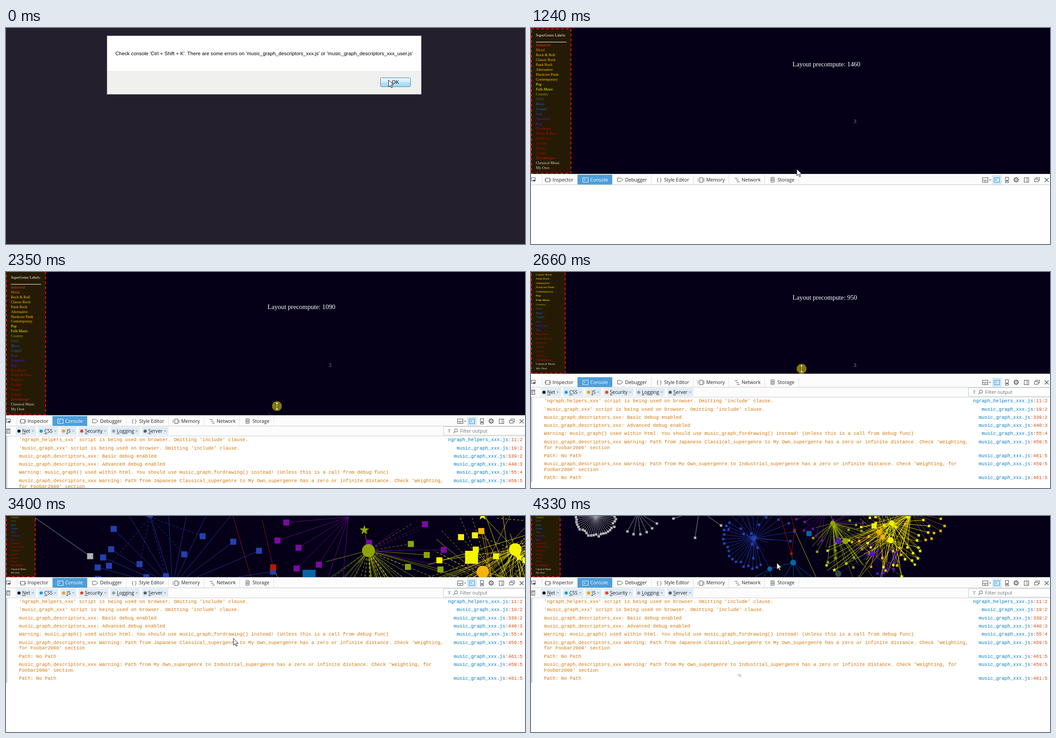
Write an HTML page with a canvas that moves like this. It is 1158x484 px and loops after 4380 ms.

```html
<!DOCTYPE html>
<html lang="en">
<head>
<meta charset="utf-8">
<title>Music graph console</title>
<style>
  html, body { margin: 0; width: 100%; height: 100%; overflow: hidden; background: #fff; }
  canvas { display: block; width: 1158px; height: 484px; }
</style>
</head>
<body>
<canvas id="stage" width="1158" height="484"></canvas>
<script>
const W = 1158, H = 484, LOOP = 4380, STEP = 71.5, DEG = Math.PI / 180;
const c = document.getElementById('stage').getContext('2d');
const SANS = '"Liberation Sans", Arial, sans-serif';
const SERIF = '"Liberation Serif", "Times New Roman", serif';
const MONO = '"Liberation Mono", "Courier New", monospace';
const UI = '"Open Sans", "Noto Sans", sans-serif';

// ---- helpers
const ramp = (t, a, b) => Math.min(1, Math.max(0, (t - a) / (b - a)));
const mix = (a, b, k) => a + (b - a) * k;

function rect(x, y, w, h, color) { c.fillStyle = color; c.fillRect(x, y, w, h); }
function box(x, y, w, h, color) { c.strokeStyle = color; c.lineWidth = 1; c.strokeRect(x + .5, y + .5, w, h); }
function dot(x, y, r, color) { c.fillStyle = color; c.beginPath(); c.arc(x, y, r, 0, 7); c.fill(); }
function ring(x, y, r, color) { c.strokeStyle = color; c.beginPath(); c.arc(x, y, r, 0, 7); c.stroke(); }
function line(color, ...p) {
  c.strokeStyle = color;
  c.beginPath();
  for (let i = 0; i < p.length; i += 2) c.lineTo(p[i], p[i + 1]);
  c.stroke();
}
function poly(pts, fill, stroke) {
  c.beginPath();
  pts.forEach(p => c.lineTo(p[0], p[1]));
  c.closePath();
  c.fillStyle = fill; c.fill();
  if (stroke) { c.strokeStyle = stroke; c.lineWidth = 1; c.stroke(); }
}
// Triangle pointing down (or up when h is negative)
function caret(x, y, w, h, color) { poly([[x - w, y], [x + w, y], [x, y + h]], color); }
// y is the middle of the capitals
function text(s, x, y, size, face, color, align = 'left') {
  c.font = size + 'px ' + face;
  c.textAlign = align;
  c.fillStyle = color;
  c.fillText(s, x, Math.round(y + size * .33));
  return c.measureText(s).width;
}

// ---- dialog
function dialog() {
  rect(0, 0, W, H, '#231f2d');
  rect(226, 18, 701, 131, '#fff');
  rect(226, 97, 701, 52, '#f0f0ee');
  rect(226, 97, 701, 1, '#dfdfdf');
  box(225, 17, 701, 131, '#a5a3aa');
  text("Check console 'Ctrl + Shift + K'. There are some errors on 'music_graph_descriptors_xxx.js' or 'music_graph_descriptors_xxx_user.js'",
    244, 57.5, 11.26, SANS, '#000');
  const g = c.createLinearGradient(0, 111, 0, 132);
  g.addColorStop(0, '#e8f6fd'); g.addColorStop(.49, '#d6effc');
  g.addColorStop(.5, '#b9e3f9'); g.addColorStop(1, '#a4d8f4');
  c.beginPath(); c.roundRect(835.5, 111.5, 67, 20, 2);
  c.fillStyle = g; c.fill();
  c.strokeStyle = '#3c7fb1'; c.lineWidth = 1; c.stroke();
  text('OK', 869, 121, 11.26, SANS, '#000', 'center');
}

// ---- genre panel
const genres = Object.entries({
  '#f03a0c': 'Industrial', '#f08000': 'Metal',
  '#ffc400': 'Rock & Roll,Classic Rock,Punk Rock,Alternative,Hardcore Punk,Contemporary',
  '#ffff00': 'Pop', '#f0ff00': 'Folk Music', '#a0ac00': 'Country', '#2f5a46': 'R&B',
  '#1068d0': 'Blues,Gospel', '#2746d8': 'Jazz', '#4c18e0': 'Jamaican,Rap',
  '#b00808': 'Breakbeat,Drum & Bass,Hardcore,Techno,House,Trance', '#d81010': 'Downtempo',
  '#d8d8d8': 'Classical Music,My Own'
}).flatMap(([color, names]) => names.split(',').map(name => [name, color]));

function panel(y0, pitch, size, w) {
  const top = y0 - 3.38 * pitch, h = 29.6 * pitch;
  rect(0, top, w, h, '#251b04');
  c.setLineDash([6, 5]);
  c.strokeStyle = '#f00a0a'; c.lineWidth = 2;
  c.strokeRect(1, top + 1, w - 1, h - 2);
  c.setLineDash([]);
  text('SuperGenre Labels:', 11, y0 - 2 * pitch, size, SERIF, '#fff');
  rect(11, Math.round(y0 - .63 * pitch), w - 21, 1, '#fff');
  genres.forEach(([name, color], i) => text(name, 11, y0 + i * pitch, size, SERIF, color));
}

// ---- graph
let seed = 11;
const rnd = () => (seed = seed * 16807 % 2147483647) / 2147483647;
const edges = [], nodes = [];
const edge = (a, b, color, dash) => edges.push([a, b, color, dash]);
const node = (p, r, color, shape) => nodes.push([p, r, color, shape]);
const leaf = (p, color) => node(p, 2.7, color, 'square');
const polar = ([x, y], r, a) => [x + r * Math.cos(a * DEG), y + r * Math.sin(a * DEG)];

// Leaves on an arc around a hub, with uneven lengths
function fan(hub, r, from, to, n, color, jitter, dash) {
  for (let i = 0; i < n; i++) {
    const p = polar(hub, r + (rnd() - .5) * 2 * jitter, mix(from, to, i / (n - 1)));
    edge(hub, p, color, dash);
    leaf(p, color);
  }
}
// Loose lines from hubs into an ellipse; some end in a leaf or a star
function web(hubs, n, x, y, rx, ry, color, starColor) {
  for (let i = 0; i < n; i++) {
    const a = rnd() * 360, d = Math.sqrt(rnd());
    const p = [x + rx * d * Math.cos(a * DEG), y + ry * d * Math.sin(a * DEG)], kind = rnd();
    edge(hubs[i % hubs.length], p, color, rnd() < .4);
    if (kind < .4) leaf(p, color);
    else if (kind < .48) node(p, 4.5, starColor, 'star');
  }
}

(function build() {
  const grey = '#b0b0b0', blue = '#2440ae', red = '#b01c08', teal = '#0864a8', olive = '#8fa404', lime = '#c6d400';
  const plum = '#7a0aa2', violet = '#5412c8', orange = '#f2b406', yellow = '#f4f400', slate = '#2c4844';

  fan([146, -2], 46, 4, 174, 25, grey, 4);
  fan([239, -8], 49, 30, 118, 6, grey, 1);
  fan([376, -13], 60, 35, 162, 3, grey, 3);

  const jazz = [498, 49], soul = [585, 104], blues = [533, 118];
  fan(jazz, 65, 76, 212, 17, blue, 4);
  fan(jazz, 80, 225, 365, 11, blue, 12);
  fan([478, -14], 45, 20, 130, 5, blue, 14, true);
  web([jazz], 9, 505, 60, 35, 50, blue, blue);
  edge(jazz, blues, blue);
  node(jazz, 5.7, blue);

  const drop = [581, 84], beat = [588, 31];
  [beat, [552, -15]].forEach(p => edge(p, drop, red));
  edge(beat, [578, -12], red);
  edge(beat, [636, 137], lime);
  leaf(beat, red);
  node(drop, 5, red, 'star');

  edge(blues, soul, teal);
  edge(soul, drop, teal);
  for (let x = 490; x < 640; x += 24) edge(x < 560 ? blues : soul, [x, 142], teal);
  edge([620, 39], soul, '#17305a', true);
  node(soul, 6.5, teal);
  node(blues, 5.5, teal);
  node([620, 39], 5.8, teal, 'square');

  const country = [673, 16], pop = [804, 15], rock = [847, -8], punk = [775, 35], alt = [784, 47];
  const song = [802, 54], rap = [760, 85], funk = [685, 129];
  fan([655, -14], 56, 95, 175, 7, plum, 14);
  web([country], 9, 700, 10, 55, 35, plum, plum);
  web([country], 30, 685, 55, 58, 82, olive, olive);
  web([country, pop], 18, 700, 70, 60, 70, lime, lime);
  fan(rap, 52, -12, 74, 12, violet, 8, true);
  web([rap], 8, 740, 85, 40, 35, violet, violet);
  web([rock, punk, alt], 48, 795, 45, 85, 82, orange, orange);
  web([pop, song, rock], 58, 798, 55, 80, 85, yellow, yellow);
  fan(rock, 72, 12, 62, 6, orange, 10, true);
  fan(pop, 78, -5, 55, 7, yellow, 14);
  // Stars along the lower rim
  for (let i = 0; i < 5; i++) {
    const p = polar([760, 40], 116, 28 + i * 27);
    [pop, song, country].forEach((h, k) => edge(h, p, k ? lime : yellow, k > 1));
    node(p, 5, yellow, 'star');
  }
  [funk, rap, song].forEach(p => edge(country, p, olive));
  edge(funk, rap, slate, true);

  node(country, 5.8, olive);
  node([685, 56], 6.8, violet);
  node([701, 56], 6.8, olive);
  node(rap, 5.8, violet);
  node(funk, 7, slate);
  node(rock, 7.5, orange);
  [punk, alt].forEach(p => node(p, 5.5, orange));
  node(pop, 5.6, yellow);
  node(song, 6.8, yellow);
  node([765, 22], 5.8, yellow, 'square');
})();

function star([x, y], r, color) {
  const pts = [];
  for (let i = 0; i < 10; i++) pts.push(polar([x, y], i % 2 ? r * .42 : r, i * 36 - 90));
  poly(pts, color);
}
// The view zooms out around a point above the stage and slows down
function graph(t) {
  const s = Math.exp(.338 * Math.pow((4330 - Math.min(t, 4330)) / 530, 1.67));
  c.save();
  c.translate(582.5, -25); c.scale(s, s); c.translate(-582.5, 25);
  c.lineWidth = .85 / s;
  edges.forEach(([a, b, color, dash]) => {
    c.setLineDash(dash ? [2, 1.6] : []);
    line(color, ...a, ...b);
  });
  c.setLineDash([]);
  nodes.forEach(([p, r, color, shape]) => {
    if (shape === 'square') rect(p[0] - r, p[1] - r, 2 * r, 2 * r, color);
    else if (shape === 'star') star(p, r, color);
    else dot(...p, r, color);
  });
  c.restore();
}

// ---- developer tools
const INK = '#4a4e52', EDGE = '#dcdfe2';
function promptIcon(x, y, color) { box(x, y - 5, 12, 10, color); line(color, x + 3, y - 2, x + 6, y, x + 3, y + 2); }
const tabs = {
  Inspector(x, y) { box(x - 5, y - 4, 10, 8, INK); line(INK, x - 7, y + .5, x - 3, y + .5); line(INK, x + 3, y + .5, x + 8, y + .5); },
  Console(x, y) { promptIcon(x - 6, y, '#fff'); },
  Debugger(x, y) { c.strokeStyle = INK; c.beginPath(); [[-6, -4], [1, -4], [6, 0], [1, 4], [-6, 4]].forEach(p => c.lineTo(x + p[0], y + p[1])); c.closePath(); c.stroke(); },
  'Style Editor'(x, y) { text('{ }', x, y, 11, UI, INK, 'center'); },
  Memory(x, y) { box(x - 4, y - 5, 7, 10, INK); line(INK, x - 7, y - 3, x - 7, y + 4); line(INK, x + 6, y - 3, x + 6, y + 4); },
  Network(x, y) { for (let i = -1; i < 2; i++) rect(x - 2 + i * 2.5, y + i * 4, 6.5, 1, INK); },
  Storage(x, y) {
    for (let i = -1; i < 2; i++) { c.strokeStyle = INK; c.beginPath(); c.ellipse(x, y + i * 3.6, 4.5, 2, 0, 0, 7); c.stroke(); }
  }
};
function sideIcons(y) {
  box(0, y - 5, 9, 7, INK); caret(7, y, 3, 5, INK);
  box(1007, y - 5, 12, 10, INK); line(INK, 1007, y + 1, 1019, y + 1); line(INK, 1013, y + 1, 1013, y + 5);
  caret(1024.5, y - 1, 2.5, 3, '#888');
  rect(1029, y - 10, 21, 21, '#d3e8f5');
  promptIcon(1033, y, '#3a94cc');
  box(1058, y - 6, 7, 12, INK); rect(1060, y + 1, 4, 3, INK);
  c.lineWidth = 1.6;
  ring(1082.5, y, 4, INK);
  for (let a = 0; a < 360; a += 45) line(INK, ...polar([1082.5, y], 4, a), ...polar([1082.5, y], 6, a));
  dot(1082.5, y, 1.2, INK);
  box(1100, y - 5, 10, 10, INK); line(INK, 1107, y - 5, 1107, y + 5);
  box(1126, y - 5, 8, 6, INK); rect(1123, y - 2, 8, 6, '#fcfcfc'); box(1123, y - 2, 8, 6, INK);
  c.lineWidth = 1.3;
  line(INK, 1146, y - 4, 1155, y + 5); line(INK, 1155, y - 4, 1146, y + 5);
}
function toolbar(y, hover) {
  rect(0, y - 12, W, 24, '#fcfcfc');
  rect(0, y + 11, W, 1, '#c4c8cc');
  rect(24, y - 11, 1, 22, EDGE);
  let x = 48;
  for (const name in tabs) {
    const on = name === 'Console';
    c.font = '10.6px ' + UI;
    const end = Math.round(x + c.measureText(name).width + 9);
    if (on) rect(x - 28, y - 11, end - x + 28, 22, '#4c9ed9');
    if (name === hover) rect(x - 28, y - 11, end - x + 28, 22, '#ebebeb');
    rect(end, y - 11, 1, 22, EDGE);
    text(name, x, y + .5, 10.6, UI, on ? '#fff' : '#202428');
    c.lineWidth = 1;
    tabs[name](x - 11, Math.round(y));
    x = end + 29;
  }
  sideIcons(Math.round(y));
}

const chips = { Net: '#17171c', CSS: '#1e9edb', JS: '#f0a018', Security: '#ea4328', Logging: '#98a2ac', Server: '#5c6068' };
function filters(y) {
  rect(0, y - 10, W, 22, '#fcfcfc');
  box(1, y - 3, 7, 8, '#444'); rect(0, y - 5, 10, 1, '#444'); rect(4, y - 1, 1, 5, '#444');
  let x = 36;
  for (const name in chips) {
    c.font = '10.6px ' + UI;
    const end = x + c.measureText(name).width + 13;
    rect(x - 14, y - 9, end - x + 14, 18, '#dfebf6');
    dot(x - 7, y + .5, 3.6, chips[name]);
    text(name, x, y + .5, 10.6, UI, '#181c20');
    rect(x, y + 6, c.measureText(name[0]).width, 1, '#22262a');
    caret(end - 7, y - 1, 3, 3, '#a2a8ae');
    x = end + 18.8;
  }
  rect(976, y - 10, W, 20, '#fff');
  box(976, y - 10, 190, 19, '#c2c6ca');
  caret(989, y - 4, 4, 6, '#c4c8cc'); rect(988, y, 2, 4, '#a5a9ad');
  c.lineWidth = 1.2;
  ring(1004, y - 1, 3.4, '#777');
  line('#777', 1001.5, y + 1.5, 998, y + 5);
  text('Filter output', 1013, y + .5, 10.6, UI, '#6c7075');
  rect(0, y + 11, W, 1, '#c8ccd0');
}

const LIB = 'music_graph_descriptors_xxx';
const log = [
  ["'ngraph_helpers_xxx' script is being used on browser. Omitting 'include' clause.", ':11:2', 'ngraph_helpers_xxx.js'],
  ["'music_graph_xxx' script is being used on browser. Omitting 'include' clause.", ':19:2'],
  [LIB + ': Basic debug enabled', ':339:2'],
  [LIB + ': Advanced debug enabled', ':440:3'],
  ['Warning: music_graph() used within html. You should use music_graph_fordrawing() instead! (Unless this is a call from debug func)', ':55:4'],
  [LIB + " Warning: Path from Japanese Classical_supergenre to My Own_supergenre has a zero or infinite distance. Check 'Weighting,\nfor Foobar2000' section", ':459:5'],
  ['Path: No Path', ':461:5'],
  [LIB + " Warning: Path from My Own_supergenre to Industrial_supergenre has a zero or infinite distance. Check 'Weighting, for\nFoobar2000' section", ':459:5'],
  ['Path: No Path', ':461:5']];
function messages(top, y, right) {
  c.save();
  c.beginPath(); c.rect(0, top, W, H - top); c.clip();
  rect(0, top, 3, y + 182 - top, '#d0cbce');
  log.forEach(([msg, pos, file = 'music_graph_xxx.js']) => {
    const w = text(pos, right, y, 10.66, MONO, '#d84a14', 'right');
    text(file, right - w, y, 10.66, MONO, '#007cc4', 'right');
    msg.split('\n').forEach((s, i) => {
      y += i * 12.8;
      text(s, 29, y, 10.66, MONO, '#d27608');
    });
    y += 18.3;
  });
  c.restore();
}
function scrollbar(top) {
  rect(1147, top, 11, H - top, '#eee');
  caret(1153.5, top + 10, 3.5, -4, '#444');
  rect(1148, top + 19, 10, 92, '#d4d6da');
  box(1148, top + 19, 10, 91, '#a0a4a8');
  for (let i = 0; i < 3; i++) rect(1151, top + 92 + i * 3, 5, 1, '#556');
}

// ---- pointers
const path = [[270, 853, 116], [650, 541, 259], [1360, 605, 329], [2200, 605, 328], [2300, 604.5, 299],
  [3010, 603, 133], [3530, 463, 338], [3800, 517, 152], [4330, 550, 101]];
function pointer(t) {
  const i = Math.max(1, path.findIndex(p => p[0] >= t)), a = path[i - 1], b = path[i], k = ramp(t, a[0], b[0]);
  return [mix(a[1], b[1], k), mix(a[2], b[2], k)];
}
function arrow(x, y, fill = '#fff') {
  poly([[0, 0], [0, 15.5], [3.6, 12], [6.2, 17.5], [8.6, 16.5], [6, 11], [10.8, 11]]
    .map(p => [x + .5 + p[0], y + .5 + p[1]]), fill, '#111');
}
function resize(x, y, glow) {
  if (glow) dot(x, y, 11, 'rgba(255,240,0,.5)');
  const half = k => [[-1, 0], [-1, 5], [-4, 5], [0, 9.5], [4, 5], [1, 5], [1, 0]].map(p => [x + p[0], y + p[1] * k]);
  poly([...half(-1), ...half(1).reverse()], glow ? '#ffffc0' : '#fff', glow ? '#55500a' : '#111');
}

// ---- timeline
function draw(t) {
  rect(0, 0, W, H, '#fff');
  if (t < 270) {
    dialog();
    if (t < 70) arrow(853, 116);
    return;
  }
  const open = t >= 570, large = t < 730, settled = t >= 3070, scrolled = t < 1890;
  const drag = ramp(t, 2300, 3005);
  const divider = !open ? H : settled ? 137.5 : 327 - 6 * ramp(t, 2200, 2290) - 186.5 * drag;
  const bar = !open ? H : settled ? 149.5 : divider + 12.7 + 12.3 * drag;

  c.save();
  c.beginPath(); c.rect(0, 0, W, divider); c.clip();
  rect(0, 0, W, divider, '#050018');
  if (t >= 3230) graph(t);
  if (large) panel(171, 15.6, 12.45, 121);
  else {
    const shrink = (327 - divider) * .0145, pitch = 11 - shrink;
    panel(divider - 26.27 * pitch, pitch, 8.4 - shrink * 1.1, 89 - shrink * 8.7);
  }
  if (t < 2930) {
    const d = t - 650, count = 1630 - d * (.269 + d * 3.6e-5);
    const y = large ? 208.5 : 81 - 2.5 * ramp(t, 2200, 2290) - 42 * drag;
    text('Layout precompute: ' + Math.round(count / 10) * 10, 583.5, y, 14.67, SERIF, '#fff');
    if (open) text('3', 719.5, 208.5, 13, SERIF, large ? '#fff' : 'rgba(255,255,255,.5)');
  }
  if (t >= 1360 && t < 2470) poly([[586, 313], [586, 327], [596, 322]], '#17122b');
  c.restore();

  if (t >= 800) toolbar(bar, t >= 3660 && t < 3900 && 'Network');
  if (t >= 1360) {
    const top = Math.round(bar + 34);
    filters(top - 12);
    messages(top, bar + (scrolled ? 39.5 : 42), scrolled ? 1136.5 : 1152.5);
    if (scrolled) scrollbar(top);
  }
  if (t >= 3600) {
    rect(460, 355, 9, 2, '#c4c4c4');
    rect(464, 357, 5, 4, '#dadada');
  }
  const [x, y] = pointer(Math.min(t, 4330));
  if (t >= 1360 && !settled) resize(x, y, !scrolled);
  else arrow(x, y, t > 4000 ? '#efeee0' : '#fff');
}

// The picture holds between screen refreshes
function loop() {
  const t = performance.now() % LOOP;
  draw(Math.max(0, Math.floor((t - 6.5) / STEP) * STEP + 6.5));
  requestAnimationFrame(loop);
}
loop();
</script>
</body>
</html>
```
